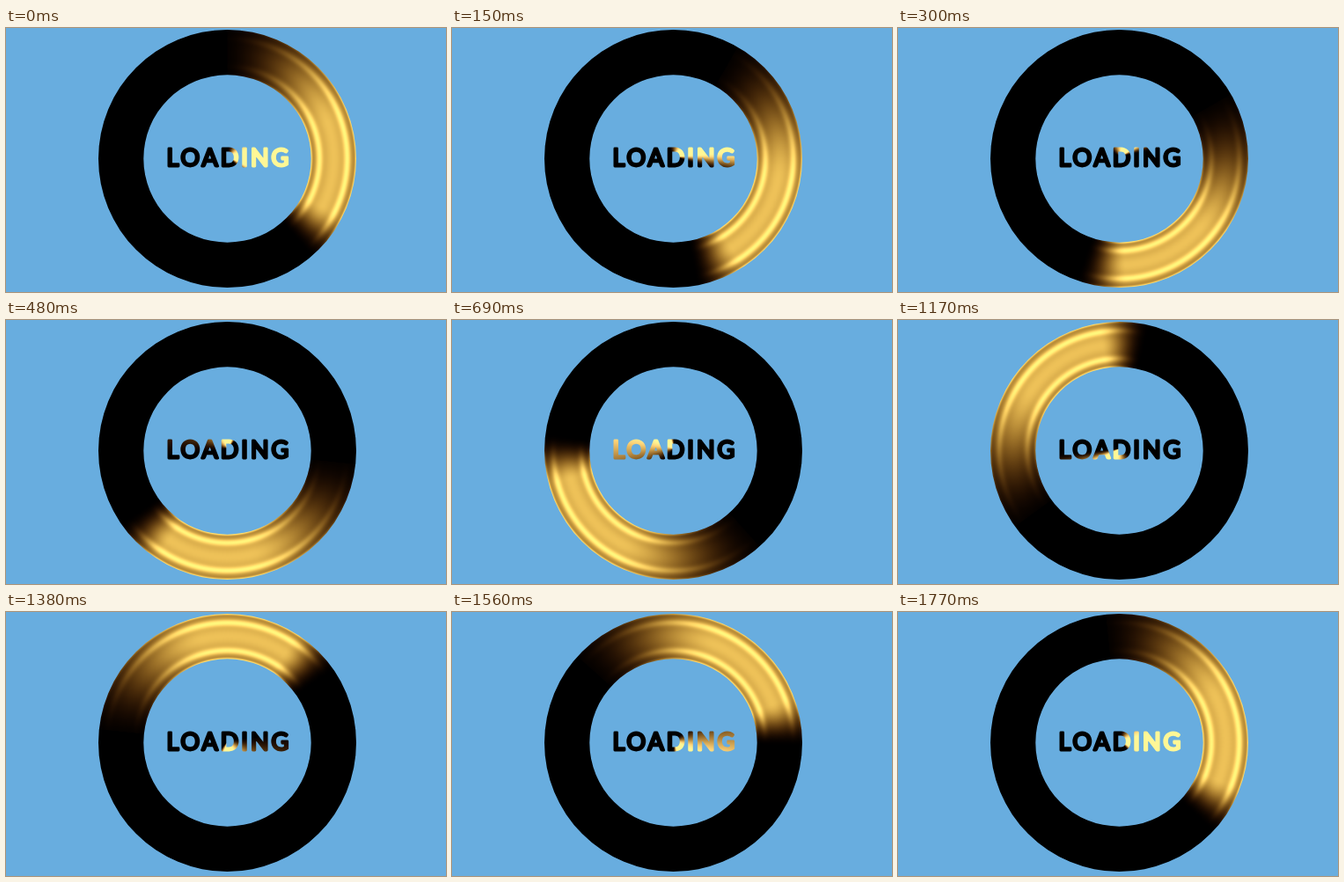
Animation, 500 px wide and 300 px high, one loop 1800 ms. Source, as an HTML page with a canvas:

```html
<!DOCTYPE html>
<html lang="en">
<head>
<meta charset="utf-8">
<title>Loading</title>
<style>
  html, body { margin: 0; width: 100%; height: 100%; overflow: hidden; background: #68addf; }
  canvas { display: block; }
</style>
</head>
<body>
<canvas id="stage" width="500" height="300" role="img" aria-label="LOADING"></canvas>
<script>
const LOOP = 1800, STEP = 30, TURN = Math.PI * 2;
const CX = 251.5, CY = 148.5, OUTER = 146.5, INNER = 95.2;
const TEXT_X = 252.5, TEXT_Y = 146, TEXT_WIDTH = 139;

function smoothstep(from, to, x) {
  const k = Math.min(1, Math.max(0, (x - from) / (to - from)));
  return k * k * (3 - 2 * k);
}

const bump = (x, center, width) => Math.exp(-(((x - center) / width) ** 2));

// Light along the ring, in degrees clockwise from the seam: slow rise, quick fall
const glow = angle => smoothstep(-8, 72, angle) * (1 - smoothstep(116, 140, angle));

// Light across the ring: soft body, two streaks, two thin rims
function section(r) {
  const body = .62 + .22 * bump(r, 121, 16);
  const streaks = bump(r, 136.5, 4) + bump(r, 104.5, 4);
  const rims = bump(r, OUTER, 1.5) + bump(r, INNER, 1.5);
  return Math.min(1, body + .3 * (streaks + rims));
}

// Black through gold to pale yellow
const gold = (v, blue) => [
  Math.min(255, 288 * v ** 1.1),
  247 * v ** 1.4,
  blue * v ** 2
];

function makeCanvas(width, height) {
  const canvas = document.createElement('canvas');
  canvas.width = width;
  canvas.height = height;
  return canvas;
}

function makeRing() {
  const size = 600, canvas = makeCanvas(size, size), g = canvas.getContext('2d');
  const image = g.createImageData(size, size);
  for (let y = 0; y < size; y++) {
    for (let x = 0; x < size; x++) {
      const dx = (x + .5) / 2 - 150, dy = (y + .5) / 2 - 150;
      const r = Math.hypot(dx, dy);
      if (r < INNER - 2 || r > OUTER + 2) continue;
      const angle = (Math.atan2(dx, -dy) * 360 / TURN + 360) % 360;
      image.data.set([...gold(glow(angle) * section(r), 125), 255], (y * size + x) * 4);
    }
  }
  g.putImageData(image, 0, 0);
  return canvas;
}

function makeWord() {
  const canvas = makeCanvas(500, 300), g = canvas.getContext('2d');
  const word = 'LOADING', stroke = 2.9;
  g.font = '400 27px Lato, "Open Sans", sans-serif';
  g.lineJoin = g.lineCap = 'round';
  g.lineWidth = stroke;
  const m = g.measureText(word);
  const ink = m.actualBoundingBoxLeft + m.actualBoundingBoxRight + stroke;
  g.letterSpacing = (TEXT_WIDTH - ink) / (word.length - 1) + 'px';
  const x = TEXT_X - TEXT_WIDTH / 2 + stroke / 2 + m.actualBoundingBoxLeft;
  g.fillText(word, x, 156.5);
  g.strokeText(word, x, 156.5);
  return canvas;
}

const ctx = document.getElementById('stage').getContext('2d');
const ring = makeRing();
const word = makeWord();
const layer = makeCanvas(500, 300), lit = layer.getContext('2d');

function drawRing(angle) {
  ctx.save();
  ctx.translate(CX, CY);
  ctx.beginPath();
  ctx.arc(0, 0, OUTER, 0, TURN);
  ctx.arc(0, 0, INNER, 0, TURN);
  ctx.clip('evenodd');
  ctx.rotate(angle);
  ctx.drawImage(ring, -150, -150, 300, 300);
  ctx.restore();
}

// The light on the word turns the opposite way
function drawWord(angle) {
  const light = lit.createConicGradient(-angle - TURN / 4, TEXT_X, TEXT_Y);
  for (let a = 0; a <= 360; a += 3) {
    light.addColorStop(a / 360, `rgb(${gold(glow(a), 150).map(Math.round)})`);
  }
  lit.globalCompositeOperation = 'copy';
  lit.drawImage(word, 0, 0);
  lit.globalCompositeOperation = 'source-in';
  lit.fillStyle = light;
  lit.fillRect(0, 0, 500, 300);
  ctx.drawImage(layer, 0, 0);
}

function draw() {
  const step = Math.floor(performance.now() % LOOP / STEP);
  const angle = step * STEP / LOOP * TURN;
  ctx.fillStyle = '#68addf';
  ctx.fillRect(0, 0, 500, 300);
  drawRing(angle);
  drawWord(angle);
  requestAnimationFrame(draw);
}
draw();
</script>
</body>
</html>
```
